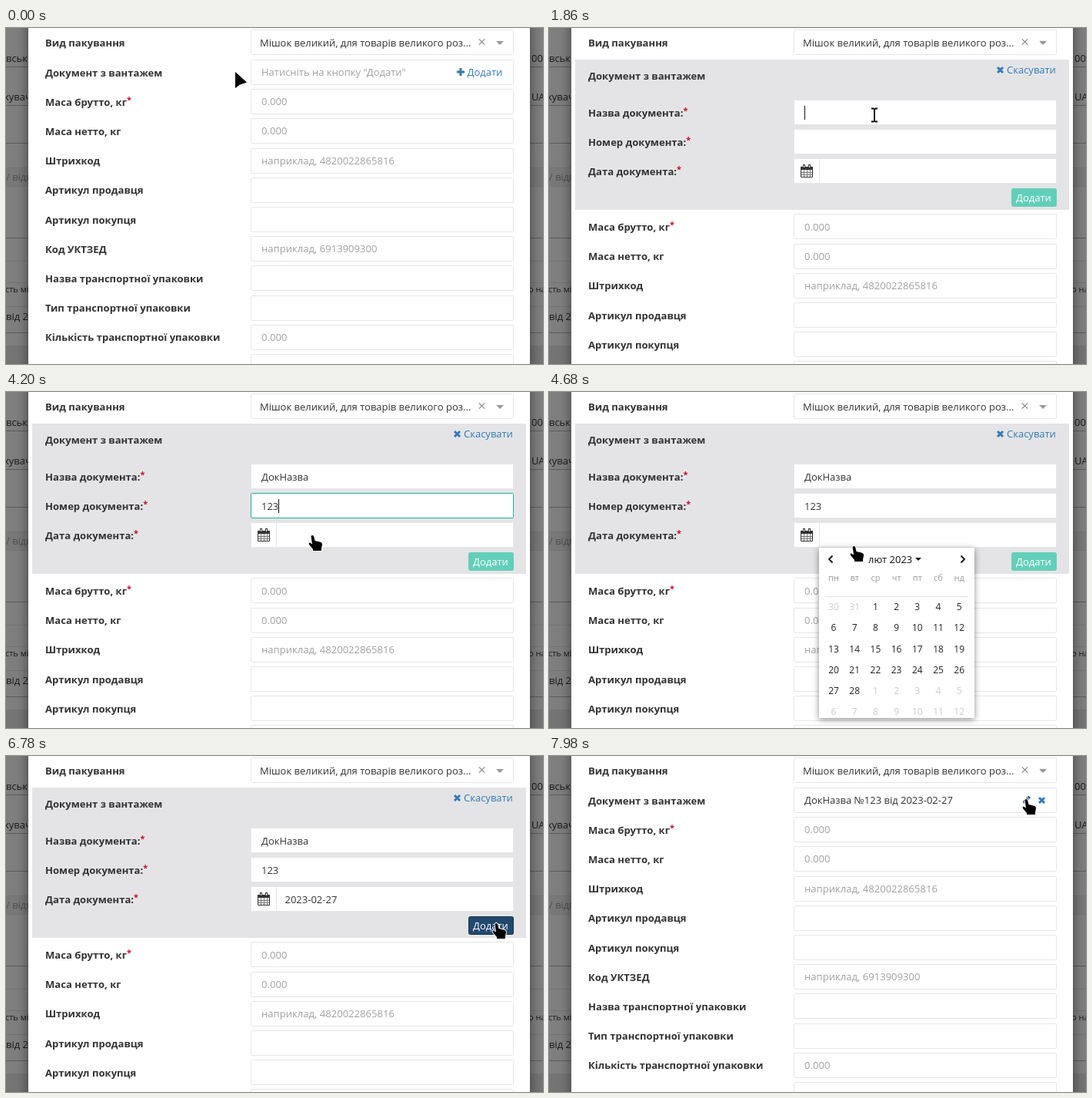
An HTML page with a canvas for the animation above (8000 ms loop, 698 by 436 pixels).

```html
<!DOCTYPE html>
<html lang="uk">
<head>
<meta charset="utf-8">
<style>
  html, body { margin: 0; width: 100%; height: 100%; overflow: hidden; background: #7f7f7f; }
  canvas { display: block; }
</style>
</head>
<body>
<canvas width="698" height="436"></canvas>
<script>
const ctx = document.querySelector('canvas').getContext('2d');
const LOOP = 8000;
const INK = '#333', MUTED = '#a0a0a0', BORDER = '#e5e6e7', LINK = '#337ab7', LINK_HOVER = '#23527c', TEAL = '#1ab394';

// Moments at which the form changes
const OPEN = 1320, NAME_FOCUS = 1830, NUMBER_FOCUS = 3360, PICKER_OPEN = 4380,
      DATE_SET = 5700, SUBMIT = 6900;
const NAME = { text: 'ДокНазва', start: 2150, step: 100 };
const NUMBER = { text: '123', start: 3600, step: 130 };

const ROWS = [
  ['Маса брутто, кг', '0.000', true], ['Маса нетто, кг', '0.000'],
  ['Штрихкод', 'наприклад, 4820022865816'], ['Артикул продавця'], ['Артикул покупця'],
  ['Код УКТЗЕД', 'наприклад, 6913909300'], ['Назва транспортної упаковки'],
  ['Тип транспортної упаковки'], ['Кількість транспортної упаковки', '0.000'], ['Загальна']
];

// Pointer stops: time, x, y
const STOPS = [
  [0, 298, 58], [850, 621, 59], [1380, 621, 59], [1800, 423, 113], [3020, 423, 113],
  [3300, 415, 150], [3880, 415, 150], [4160, 399, 186], [4560, 399, 186], [5300, 372, 381],
  [5720, 372, 381], [6450, 638, 217], [7060, 638, 217], [7680, 621, 56], [8000, 621, 56]
];

function pointerAt(t) {
  const i = Math.max(1, STOPS.findIndex(s => s[0] > t));
  const [t0, x0, y0] = STOPS[i - 1], [t1, x1, y1] = STOPS[i];
  const p = (t - t0) / (t1 - t0), e = p * p * (3 - 2 * p);
  return { x: x0 + (x1 - x0) * e, y: y0 + (y1 - y0) * e };
}

const typed = (entry, t) =>
  entry.text.slice(0, Math.max(0, Math.floor((t - entry.start) / entry.step) + 1));

function text(str, x, y, color = INK, size = 13, weight = 400, align = 'left') {
  ctx.font = `${weight} ${size}px "Open Sans", sans-serif`;
  ctx.textAlign = align;
  ctx.fillStyle = color;
  ctx.fillText(str, x, Math.round(y));
  return ctx.measureText(str).width;
}

function rect(x, y, w, h, color) {
  ctx.fillStyle = color;
  ctx.fillRect(x, y, w, h);
}

function line(points, color, width) {
  ctx.beginPath();
  points.forEach(([x, y], i) => i ? ctx.lineTo(x, y) : ctx.moveTo(x, y));
  ctx.strokeStyle = color;
  ctx.lineWidth = width;
  ctx.stroke();
}

function box(x, y, w, h, radius, fill, stroke) {
  ctx.beginPath();
  ctx.roundRect(x + .5, y + .5, w, h, radius);
  ctx.fillStyle = fill;
  ctx.fill();
  ctx.strokeStyle = stroke;
  ctx.lineWidth = 1;
  ctx.stroke();
}

function shadowed(draw, blur, y, alpha) {
  ctx.save();
  ctx.shadowColor = `rgba(0,0,0,${alpha})`;
  ctx.shadowBlur = blur;
  ctx.shadowOffsetY = y;
  draw();
  ctx.restore();
}

function label(str, y, required) {
  const w = text(str, 51, y + 5, INK, 13.08, 700);
  if (required) text('*', 51 + w, y + 1, '#c4102f', 11, 700);
}

function field(y, value, color = MUTED, border = BORDER, size = 13) {
  box(318, Math.round(y - 16.6), 341, 32, 1, '#fff', border);
  if (value) text(value, 332, y + 4.5, color, size);
}

function cross(x, y, r, color, width) {
  line([[x - r, y - r], [x + r, y + r]], color, width);
  line([[x + r, y - r], [x - r, y + r]], color, width);
}

function triangle(x, y, half, color) {
  ctx.fillStyle = color;
  ctx.fill(new Path2D(`M${x - half} ${y}h${2 * half}l${-half} ${half}z`));
}

function backdrop() {
  rect(0, 0, 698, 436, '#7f7f7f');
  rect(0, 181, 698, 24, '#797979');
  rect(0, 412, 698, 24, '#757575');
  for (const y of [50, 100, 149, 272, 395]) rect(0, y, 698, 1, '#5c5c5c');
  for (const y of [181, 205, 302, 330, 361]) rect(0, y, 698, 1, '#747474');
  const dark = '#1c1c1c';
  text('вськ', 0, 44, dark);
  text('хувач', -3, 94, dark);
  text('/ відп', 0, 198, '#505050');
  text('сть мі', -1, 343, dark, 11);
  text('від 20', 0, 379, dark);
  text('00', 683, 44, dark);
  text('UA', 683, 94, dark);
  text('о на', 679, 343, dark, 11);
  shadowed(() => rect(29, -20, 652, 480, '#fff'), 15, 5, .5);
}

function packagingRow() {
  label('Вид пакування', 19);
  field(19);
  text('Мішок великий, для товарів великого роз...', 330, 24);
  cross(618.5, 18, 3.7, '#888', 1.2);
  triangle(642, 17, 5, '#999');
}

function pencil(color) {
  ctx.save();
  ctx.translate(620, 57.5);
  ctx.rotate(Math.PI / 4);
  rect(-2, -6.5, 4, 2.2, color);
  rect(-2, -3.6, 4, 6.8, color);
  triangle(0, 3.2, 2, color);
  ctx.restore();
}

function documentRow(t) {
  label('Документ з вантажем', 57.6);
  if (t >= SUBMIT) {
    field(57.2, 'ДокНазва №123 від 2023-02-27', INK);
    pencil(t > 7560 ? LINK_HOVER : LINK);
    cross(640.5, 57.5, 3.5, LINK, 3);
    return;
  }
  const color = pointerAt(t).x > 583 ? LINK_HOVER : LINK;
  field(57.2, 'Натисніть на кнопку "Додати"');
  rect(586, 55.5, 10, 3, color);
  rect(589.5, 52, 3, 10, color);
  text('Додати', 599.5, 62, color);
}

function input(y, entry, t, focusAt, blurAt) {
  const value = typed(entry, t);
  const focused = t >= focusAt && t < blurAt;
  field(y, value, INK);
  if (!focused) return;
  ctx.globalAlpha = Math.min(1, Math.max(0, (t - focusAt - 30) / 150));
  field(y, value, INK, TEAL);
  ctx.globalAlpha = 1;
  const lastKey = value ? entry.start + (value.length - 1) * entry.step : focusAt;
  if ((t - lastKey) % 1060 < 530) {
    ctx.font = '13px "Open Sans", sans-serif';
    rect(Math.round(332 + ctx.measureText(value).width), y - 9, 1, 18, '#111');
  }
}

function calendarIcon() {
  const grid = '#777';
  for (const x of [331, 335, 339]) rect(x, 184, 1, 10, grid);
  for (const y of [187, 190]) rect(327, y, 16, 1, grid);
  line([[327.5, 181], [327.5, 193.5], [342.5, 193.5], [342.5, 181]], INK, 1);
  rect(327, 180, 16, 4, INK);
  for (const x of [330, 337]) {
    rect(x, 177, 3, 5, INK);
    rect(x + 1, 178, 1, 3, '#fff');
  }
}

function documentPanel(t) {
  rect(34, 41, 642, 195, '#e4e4e6');
  label('Документ з вантажем', 62);
  cross(586.5, 54.5, 3.5, LINK, 3);
  text('Скасувати', 595, 59, LINK);

  label('Назва документа:', 110, true);
  label('Номер документа:', 148, true);
  label('Дата документа:', 186, true);
  input(110, NAME, t, NAME_FOCUS, NUMBER_FOCUS);
  input(148, NUMBER, t, NUMBER_FOCUS, PICKER_OPEN - 60);
  field(186);
  rect(351, 170, 1, 31, BORDER);
  calendarIcon();
  if (t >= DATE_SET) text('2023-02-27', 362.5, 191);

  const p = pointerAt(t);
  const hover = t >= DATE_SET && p.x > 601 && p.y < 232;
  const fill = hover ? '#23486d' : t >= DATE_SET ? '#1dc1a0' : '#63cfb9';
  box(601, 208, 58, 23, 2, fill, hover ? '#173553' : fill);
  text('Додати', 607, 225, '#fff');
}

function datePicker(t) {
  shadowed(() => rect(351, 202, 202, 221, '#fff'), 8, 2, .45);
  line([[368.5, 212.5], [364, 217], [368.5, 221.5]], '#111', 1.8);
  line([[535.5, 212.5], [540, 217], [535.5, 221.5]], '#111', 1.8);
  text('лют 2023', 415, 222, '#111');
  triangle(480, 215, 4, '#111');
  rect(359, 265, 186, 1, '#e0e0e0');

  const column = i => 370 + 27.2 * i;
  ['пн', 'вт', 'ср', 'чт', 'пт', 'сб', 'нд'].forEach((d, i) =>
    text(d, column(i), 245, '#999', 11, 400, 'center'));
  const p = pointerAt(t);
  for (let i = 0; i < 42; i++) {
    const day = new Date(2023, 0, 30 + i);
    const x = column(i % 7), y = 279 + 27.1 * Math.floor(i / 7);
    const current = day.getMonth() === 1;
    if (current && Math.abs(p.x - x) < 13 && Math.abs(p.y - y) < 13) {
      ctx.beginPath();
      ctx.arc(x, y, 11.5, 0, 7);
      ctx.fillStyle = '#eee';
      ctx.fill();
      ctx.strokeStyle = '#777';
      ctx.lineWidth = 1;
      ctx.stroke();
    }
    text(day.getDate(), x, y + 4.3, current ? '#222' : '#ccc', 12, 400, 'center');
  }
}

const ARROW = new Path2D('M0-1V20L6 15.5L15 12.5Z');
const HAND = new Path2D('M-2.5 1Q-1-1 1 1L2.5 7L9 8.5Q12 9 12 12L11 17V20H0V18L-5 12Q-6 9-4 9.5L-1 11.5Z');
const BEAM = new Path2D('M-4-8.5H-1.5L0-7.5L1.5-8.5H4M-4 8.5H-1.5L0 7.5L1.5 8.5H4M0-7.5V7.5');

function pointer(t) {
  const { x, y } = pointerAt(t);
  const panelOpen = t >= OPEN && t < SUBMIT;
  const pickerOpen = t >= PICKER_OPEN && t < DATE_SET;
  const overField = panelOpen && x > 318 && x < 660 && ((y > 94 && y < 126) || (y > 132 && y < 164));
  const overHand = pickerOpen ? y < 202 || y > 268
    : panelOpen ? (y > 170 && y < 202 && x < 660) || (x > 601 && y > 208 && y < 232)
    : x > 583 && y < 74;
  const overLowerField = panelOpen && !pickerOpen && y > 242 && (y - 242) % 38.2 < 32;

  ctx.save();
  ctx.translate(x, y);
  ctx.lineJoin = 'round';
  if (overField || overLowerField) {
    ctx.strokeStyle = '#fff';
    ctx.lineWidth = 3.5;
    ctx.stroke(BEAM);
    ctx.strokeStyle = '#000';
    ctx.lineWidth = 1.8;
    ctx.stroke(BEAM);
  } else {
    const shape = overHand ? HAND : ARROW;
    ctx.strokeStyle = '#fff';
    ctx.lineWidth = 1.8;
    ctx.stroke(shape);
    ctx.fillStyle = '#000';
    ctx.fill(shape);
  }
  ctx.restore();
}

function render(now) {
  const t = now % LOOP;
  const panelOpen = t >= OPEN && t < SUBMIT;
  backdrop();
  packagingRow();
  if (panelOpen) documentPanel(t);
  else documentRow(t);
  ROWS.forEach(([name, hint, required], i) => {
    const y = (panelOpen ? 258 : 95.7) + 38.2 * i;
    label(name, y, required);
    field(y, hint, MUTED, BORDER, 13.1);
  });
  if (t >= PICKER_OPEN && t < DATE_SET) datePicker(t);
  pointer(t);
  requestAnimationFrame(render);
}
requestAnimationFrame(render);
</script>
</body>
</html>
```
